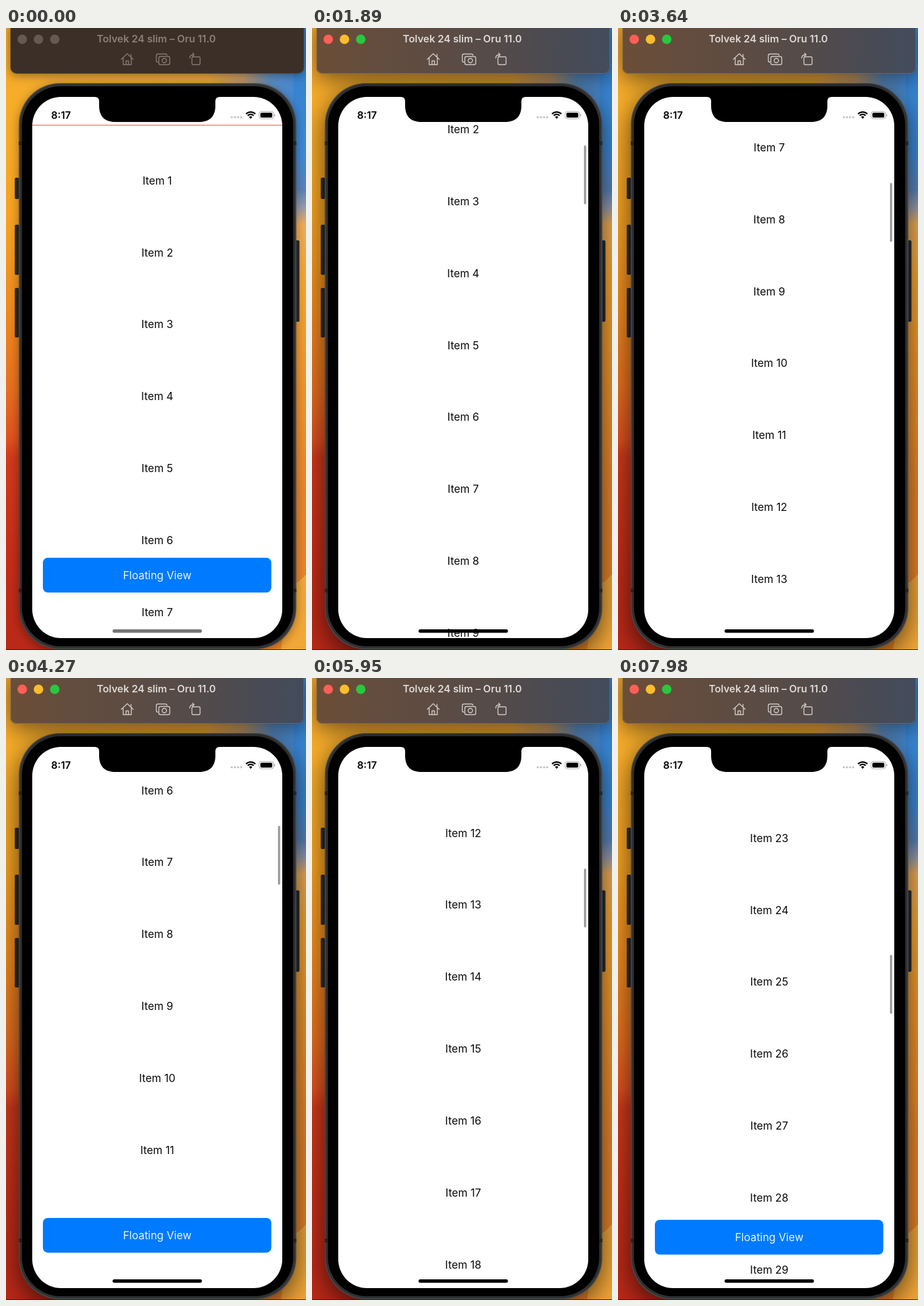
These frames come from a looping animation (480x993 px, 8000 ms). An HTML page with a canvas:

```html
<!DOCTYPE html>
<html lang="en">
<head>
<meta charset="utf-8">
<title>Floating view</title>
<style>
html, body { margin: 0; width: 100%; height: 100%; overflow: hidden; background: #000; }
canvas { display: block; width: 480px; height: 993px; }
</style>
</head>
<body>
<canvas id="stage" width="480" height="993"></canvas>
<script>
const W = 480, H = 993, LOOP = 8000, STEP = 70;
const ctx = document.getElementById('stage').getContext('2d');
const FONT = 'Inter, "Open Sans", sans-serif';

const ACTIVATE = 1470;
const REST_Y = 865, TRAVEL = 118;
const ROW = 114.85, FIRST_ROW = 243.6;

// Scroll offset: [time, px]
const SCROLL = [
  [1470, 0], [2660, 729.1], [2850, 742], [3650, 742], [4150, 638.5],
  [4900, 638.5], [5950, 1259.5], [7100, 2579.3], [7290, 2579.3], [7800, 2514.8]
];
// Floating view: [time, visible]
const TOGGLES = [[-363, true], [1560, false], [3710, true], [5000, false], [7375, true]];

function slope(i) {
  if (i <= 0 || i >= SCROLL.length - 1) return 0;
  const rate = k => (SCROLL[k + 1][1] - SCROLL[k][1]) / (SCROLL[k + 1][0] - SCROLL[k][0]);
  const a = rate(i - 1), b = rate(i);
  return a * b <= 0 ? 0 : 2 * a * b / (a + b);
}

function scrollAt(t) {
  const last = SCROLL.length - 1;
  if (t <= SCROLL[0][0]) return SCROLL[0][1];
  if (t >= SCROLL[last][0]) return SCROLL[last][1];
  const i = SCROLL.findIndex(p => p[0] > t) - 1;
  const [t0, a] = SCROLL[i], [t1, b] = SCROLL[i + 1];
  const d = t1 - t0, u = (t - t0) / d, v = 1 - u;
  return a * v * v * (1 + 2 * u) + b * u * u * (3 - 2 * u)
    + d * (slope(i) * u * v * v - slope(i + 1) * u * u * v);
}

// Remaining distance of a spring with half critical damping
function spring(ms) {
  const s = ms / 1000, w = 8.66 * s;
  return Math.exp(-5 * s) * (Math.cos(w) + 0.577 * Math.sin(w));
}

function floatY(t) {
  const [start, visible] = TOGGLES.filter(e => e[0] <= t).pop();
  const x = spring(t - start);
  return REST_Y + TRAVEL * (visible ? x : 1 - x);
}

function box(x, y, w, h, r, fill) {
  ctx.beginPath();
  ctx.roundRect(x, y, w, h, r);
  ctx.fillStyle = fill;
  ctx.fill();
}

function dot(x, y, r, fill) {
  ctx.beginPath();
  ctx.arc(x, y, r, 0, Math.PI * 2);
  ctx.fillStyle = fill;
  ctx.fill();
}

function label(text, x, y, size, weight, fill) {
  ctx.font = `${weight} ${size}px ${FONT}`;
  ctx.textAlign = 'center';
  ctx.textBaseline = 'alphabetic';
  ctx.fillStyle = fill;
  ctx.fillText(text, x, y + size * 0.36);
}

function ramp(x0, y0, x1, y1, stops) {
  const g = ctx.createLinearGradient(x0, y0, x1, y1);
  stops.forEach(([at, color]) => g.addColorStop(at, color));
  return g;
}

function shadow(blur, alpha, dy) {
  ctx.shadowBlur = blur;
  ctx.shadowOffsetY = dy;
  ctx.shadowColor = `rgba(0,0,0,${alpha})`;
}

function wallpaper() {
  ctx.fillStyle = ramp(0, 0, 0, H, [
    [0, '#f3a52b'], [0.12, '#f8ad29'], [0.3, '#f7a322'], [0.45, '#ee8a1e'],
    [0.58, '#e8701f'], [0.66, '#e0521f'], [0.69, '#d03a1a'], [0.85, '#c62d18'], [1, '#b92818']
  ]);
  ctx.fillRect(0, 0, 240, H);
  ctx.fillStyle = ramp(0, 0, 0, H, [
    [0, '#347fcc'], [0.2, '#3c8ad8'], [0.26, '#5a83ba'], [0.29, '#9b9daa'],
    [0.315, '#efad58'], [0.4, '#f5a42e'], [0.6, '#ef922b'], [0.75, '#e8852a'], [1, '#ea8522']
  ]);
  ctx.fillRect(240, 0, 240, H);
  ctx.fillStyle = ramp(0, 0, W, 30, [
    [0, '#f7ad29'], [0.68, '#f0a83a'], [0.8, '#c59b68'], [0.89, '#5c8dc4'], [1, '#3b87d4']
  ]);
  ctx.fillRect(20, 0, 440, 150);
  // Lighter petal at the lower right
  ctx.beginPath();
  ctx.moveTo(455, 893);
  ctx.quadraticCurveTo(472, 884, 480, 873);
  ctx.lineTo(480, H);
  ctx.lineTo(440, H);
  ctx.fillStyle = '#f3a737';
  ctx.fill();
  ctx.strokeStyle = '#f3bb70';
  ctx.lineWidth = 1;
  ctx.beginPath();
  ctx.moveTo(455, 893);
  ctx.quadraticCurveTo(472, 884, 480, 873);
  ctx.stroke();
}

function toolbarIcons(color) {
  ctx.strokeStyle = color;
  ctx.lineWidth = 1.4;
  ctx.lineJoin = ctx.lineCap = 'round';
  ctx.beginPath();
  // Home
  ctx.moveTo(184.5, 50); ctx.lineTo(194, 41); ctx.lineTo(203.5, 50);
  ctx.moveTo(187.5, 48); ctx.lineTo(187.5, 58.5); ctx.lineTo(200.5, 58.5); ctx.lineTo(200.5, 48);
  ctx.moveTo(192, 58); ctx.lineTo(192, 52.5); ctx.lineTo(196, 52.5); ctx.lineTo(196, 58);
  ctx.moveTo(200, 46); ctx.lineTo(200, 42);
  // Camera
  ctx.moveTo(243, 54.5); ctx.quadraticCurveTo(240.5, 54.5, 240.5, 52);
  ctx.lineTo(240.5, 44); ctx.quadraticCurveTo(240.5, 41.5, 243, 41.5);
  ctx.lineTo(255, 41.5); ctx.quadraticCurveTo(257.5, 41.5, 257.5, 43.5);
  ctx.roundRect(244.5, 45.5, 17.5, 13, 2.5);
  ctx.moveTo(256.8, 52); ctx.arc(253.3, 52, 3.5, 0, Math.PI * 2);
  // Rotate
  ctx.roundRect(297.5, 46, 13, 12.5, 2);
  ctx.moveTo(294, 48); ctx.quadraticCurveTo(294, 42.5, 301, 42.5);
  ctx.moveTo(298.5, 40); ctx.lineTo(301, 42.5); ctx.lineTo(298.5, 45);
  ctx.stroke();
}

function toolbar(active) {
  shadow(active ? 34 : 16, active ? 0.5 : 0.4, active ? 9 : 3);
  box(7, -12, 470, 85, 10, '#3c2f28');
  shadow(0, 0, 0);
  if (active) {
    box(7, -12, 470, 85, 10, ramp(7, 0, 477, 20, [
      [0, '#6b4e37'], [0.3, '#604c40'], [0.6, '#554b48'], [0.85, '#484a54'], [1, '#434c5c']
    ]));
  }
  ctx.strokeStyle = active ? 'rgba(255,255,255,.16)' : 'rgba(255,255,255,.10)';
  ctx.lineWidth = 1;
  ctx.beginPath();
  ctx.roundRect(7.5, -12, 469, 84.5, 10);
  ctx.stroke();
  const lights = active ? ['#ff5f57', '#febc2e', '#28c840'] : Array(3).fill('#655950');
  lights.forEach((c, i) => dot(26 + 26 * i, 18, 7.6, c));
  label('Tolvek 24 slim – Oru 11.0', 240.5, 17.5, 16.2, 600, active ? '#dfd9d5' : '#8c7f77');
  toolbarIcons(active ? '#d2cbc6' : '#887b73');
}

function button(x, y, h) {
  box(x, y, 7, h, 2, '#29292b');
  ctx.fillStyle = '#48484a';
  ctx.fillRect(x + 1, y + 1, 1, h - 2);
}

function body(active) {
  [[239, 34], [314, 80], [415, 79]].forEach(([y, h]) => button(14, y, h));
  button(462.5, 339, 130);
  shadow(active ? 42 : 16, active ? 0.62 : 0.36, active ? 12 : 3);
  box(20.5, 88, 444, 904, 66, '#48494b');
  shadow(0, 0, 0);
  box(22, 89.5, 441, 901, 65, '#303133');
  ctx.fillStyle = '#232426';
  [184, 898].forEach(y => {
    ctx.fillRect(20.5, y - 3, 5, 6);
    ctx.fillRect(459.5, y - 3, 5, 6);
  });
  box(25.5, 93, 434, 894, 62, '#000');
}

function notch() {
  ctx.beginPath();
  ctx.moveTo(142, 109);
  ctx.lineTo(142, 110);
  ctx.quadraticCurveTo(149, 110, 149, 117);
  ctx.lineTo(149, 124);
  ctx.bezierCurveTo(149, 141, 158, 150, 175, 150);
  ctx.lineTo(309, 150);
  ctx.bezierCurveTo(326, 150, 335, 141, 335, 124);
  ctx.lineTo(335, 117);
  ctx.quadraticCurveTo(335, 110, 342, 110);
  ctx.lineTo(342, 109);
  ctx.fillStyle = '#000';
  ctx.fill();
}

function statusBar() {
  label('8:17', 88, 139.2, 16, 600, '#000');
  for (let i = 0; i < 4; i++) dot(361.3 + 5 * i, 142.5, 1.8, '#c6c6c8');
  // Wi-Fi
  ctx.strokeStyle = '#000';
  ctx.lineCap = 'butt';
  ctx.lineWidth = 2.3;
  [6.6, 10.4].forEach(r => {
    ctx.beginPath();
    ctx.arc(391.5, 144.5, r, -Math.PI * 0.755, -Math.PI * 0.245);
    ctx.stroke();
  });
  ctx.beginPath();
  ctx.moveTo(391.5, 145);
  ctx.arc(391.5, 144.5, 3.6, -Math.PI * 0.755, -Math.PI * 0.245);
  ctx.fillStyle = '#000';
  ctx.fill();
  // Battery
  ctx.strokeStyle = '#a5a5a7';
  ctx.lineWidth = 1;
  ctx.beginPath();
  ctx.roundRect(405, 133.3, 23, 11.6, 3.6);
  ctx.stroke();
  box(407, 135.2, 19, 7.8, 2, '#000');
  box(429.2, 137.2, 1.4, 4, 0.7, '#a5a5a7');
}

function screen(t, active) {
  const offset = scrollAt(t), y = floatY(t);
  ctx.save();
  ctx.beginPath();
  ctx.roundRect(42, 110, 400, 864, 46);
  ctx.fillStyle = '#fff';
  ctx.fill();
  ctx.clip();

  ctx.fillStyle = '#ea8878';
  ctx.fillRect(42, 154.5 - offset, 400, 1.5);
  const first = Math.max(0, Math.floor((offset - 140) / ROW));
  for (let i = first; i < first + 11; i++) {
    label('Item ' + (i + 1), 242, FIRST_ROW + ROW * i - offset, 17.2, 400, '#0a0a0a');
  }
  if (active) box(435.2, 165.9 + offset * 0.1098, 3.4, 94, 1.7, '#999');

  box(59, y, 365.5, 55.5, 8, '#007aff');
  label('Floating View', 242, y + 28, 17.2, 400, '#e9f3ff');

  statusBar();
  notch();
  box(170.5, 960, 143, 5.4, 2.7, active ? '#000' : '#757575');
  ctx.restore();
}

function draw(now) {
  const t = Math.floor(now % LOOP / STEP) * STEP;
  const active = t >= ACTIVATE;
  ctx.clearRect(0, 0, W, H);
  wallpaper();
  body(active);
  toolbar(active);
  screen(t, active);
  ctx.fillStyle = '#0b3312';
  ctx.fillRect(0, 992, W, 1);
}

let start = null;
function tick(now) {
  if (start === null) start = now;
  draw(now - start);
  requestAnimationFrame(tick);
}
draw(0);
requestAnimationFrame(tick);
</script>
</body>
</html>
```
